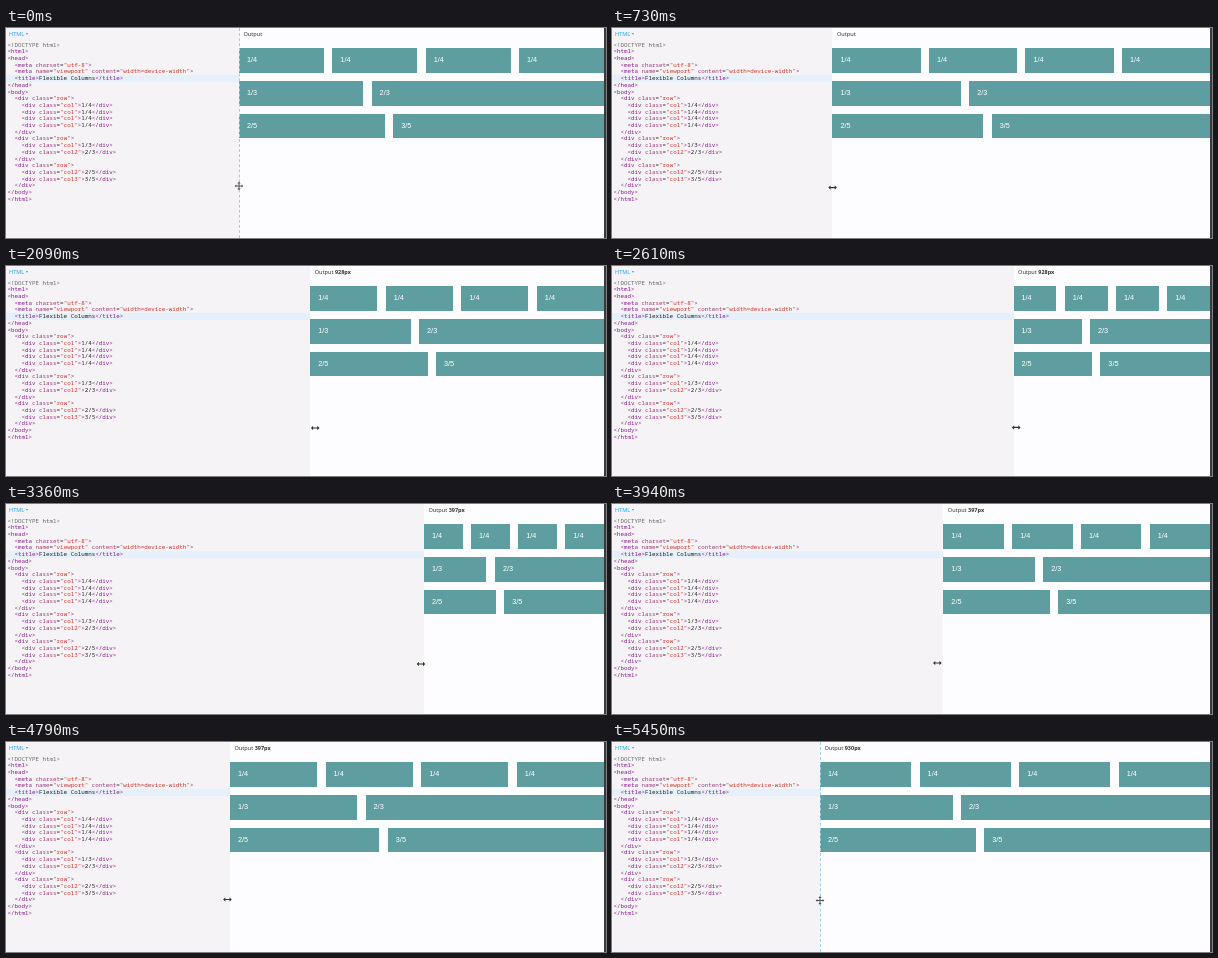
Recreate the animation shown at these times as an HTML page. Size 600 px wide and 210 px high, loop 5510 ms.

```html
<!DOCTYPE html>
<html lang="en">
<head>
<meta charset="utf-8">
<title>Flexible Columns</title>
<style>
  html, body { margin: 0; width: 100%; height: 100%; overflow: hidden; }
  #stage { position: relative; width: 600px; height: 210px; overflow: hidden; background: #fdfcfe; }
  #editor { position: absolute; left: 0; top: 0; height: 210px; overflow: hidden; background: #f5f3f6; }
  .head { position: absolute; top: 1px; white-space: nowrap; font: 500 5.6px/10px "Noto Sans", "Open Sans", sans-serif; color: #333; }
  #editor .head { left: 3px; color: #1ea8ec; }
  .head i { display: inline-block; margin-left: 2px; vertical-align: 1px; border: 1.8px solid transparent; border-top: 2.6px solid #1ea8ec; border-bottom: 0; }
  #code { position: absolute; left: 0; top: 13.6px; width: 100%; margin: 0; font: 5.85px/6.717px "Noto Sans Mono", "DejaVu Sans Mono", monospace; color: #222; }
  #code div { height: 6.717px; padding-left: 1.5px; white-space: pre; }
  #code .active { background: #e5f0fb; }
  .doctype { color: #666; }
  .tag { color: #8a1a8c; }
  .attr { color: #a03a78; }
  .str { color: #d0342c; }
  #output { position: absolute; top: 0; right: 2px; height: 210px; }
  #output .head { left: 4.5px; }
  #output b { font-weight: 700; font-size: 5.5px; }
  .row { position: absolute; left: 0; right: 0; height: 24.4px; display: flex; }
  .row div { flex: 1 1 0; min-width: 0; padding: 0 8px; background: #5f9ea0; color: #fff; font: 7.3px/24.4px "Liberation Sans", Arial, sans-serif; }
  .row div + div { margin-left: 8.4px; }
  #edge { position: absolute; right: 0; top: 0; width: 2px; height: 210px; background: #3a3a3e; }
  #guide { position: absolute; left: 0; top: 0; height: 210px; border-left: 1px dashed #9fcfe4; }
  #cursor { position: absolute; left: -6px; top: -6px; width: 12px; height: 12px; }
</style>
</head>
<body>
<div id="stage">
  <div id="output">
    <div class="head">Output <b id="size"></b></div>
  </div>
  <div id="editor">
    <div class="head">HTML<i></i></div>
    <div id="code"></div>
  </div>
  <div id="edge"></div>
  <div id="guide"></div>
  <svg id="cursor" viewBox="-6 -6 12 12">
    <path id="move" fill="#55555c" stroke="#fff" stroke-width=".4" paint-order="stroke"
      d="M0-4.4 1.6-2.6H.5V-.5H2.6V-1.6L4.4 0 2.6 1.6V.5H.5V2.6H1.6L0 4.4-1.6 2.6H-.5V.5H-2.6V1.6L-4.4 0-2.6-1.6V-.5H-.5V-2.6H-1.6Z"/>
    <path id="resize" fill="#333" stroke="#fff" stroke-width=".5" paint-order="stroke"
      d="M-4.3 0-2.1-2.2V-.6H2.1V-2.2L4.3 0 2.1 2.2V.6H-2.1V2.2Z"/>
  </svg>
</div>
<script>
const LOOP = 5510, GRAB = 60, RELEASE = 5300;
const $ = id => document.getElementById(id);

const source = `<!DOCTYPE html>
<html>
<head>
  <meta charset="utf-8">
  <meta name="viewport" content="width=device-width">
  <title>Flexible Columns</title>
</head>
<body>
  <div class="row">
    <div class="col">1/4</div>
    <div class="col">1/4</div>
    <div class="col">1/4</div>
    <div class="col">1/4</div>
  </div>
  <div class="row">
    <div class="col">1/3</div>
    <div class="col2">2/3</div>
  </div>
  <div class="row">
    <div class="col2">2/5</div>
    <div class="col3">3/5</div>
  </div>
</body>
</html>`;

function span(parent, cls, text) {
  const el = document.createElement('span');
  el.className = cls;
  el.textContent = text;
  parent.append(el);
}

function addLine(text) {
  const line = document.createElement('div');
  if (text.includes('<title>')) line.className = 'active';
  const parts = text.match(/<!.*?>|<\/?\w+|>|"[^"]*"|\w+(?==")|[^<>"]+?(?=[<>"]|\w+="|$)/g);
  for (const part of parts) {
    const cls = part.startsWith('<!') ? 'doctype'
      : /^[<>]/.test(part) ? 'tag'
      : part[0] === '"' ? 'str'
      : /^(class|charset|name|content)$/.test(part) ? 'attr' : '';
    span(line, cls, part);
  }
  $('code').append(line);
}
source.split('\n').forEach(addLine);

[['1/4', '1/4', '1/4', '1/4'], ['1/3', '2/3'], ['2/5', '3/5']].forEach((cells, i) => {
  const row = document.createElement('div');
  row.className = 'row';
  row.style.top = 20.4 + i * 32.8 + 'px';
  for (const text of cells) {
    const cell = document.createElement('div');
    cell.textContent = text;
    if (cells.length === 2) cell.style.flexGrow = text[0];
    row.append(cell);
  }
  $('output').append(row);
});

// Monotone cubic curve through [time, value] points
function curve(points) {
  const slope = points.slice(1).map(([t, v], i) => (v - points[i][1]) / (t - points[i][0]));
  const tangent = points.map((_, i) => {
    const a = slope[i - 1], b = slope[i];
    return a * b > 0 ? 2 * a * b / (a + b) : 0;
  });
  return t => {
    const next = points.findIndex(p => p[0] > t);
    if (next < 0) return points[points.length - 1][1];
    const i = Math.max(0, next - 1);
    const [t0, v0] = points[i], [t1, v1] = points[i + 1];
    const d = t1 - t0, u = (t - t0) / d, w = 1 - u;
    return v0 * (1 + 2 * u) * w * w + d * tangent[i] * u * w * w
      + v1 * u * u * (3 - 2 * u) - d * tangent[i + 1] * u * u * w;
  };
}

const dividerAt = curve([[0, 233], [90, 233], [600, 226], [1060, 205], [1190, 205], [1270, 207],
  [1730, 231], [2090, 304], [2300, 350], [2960, 432.5], [3040, 432.5], [3360, 418], [3450, 406],
  [3940, 331.5], [4640, 242], [4790, 224], [5210, 208.3], [5300, 208], [LOOP, 208]]);
const leadAt = curve([[0, 0], [1270, .5], [2090, 5], [2300, 5], [2960, 0], [3040, 0],
  [3360, -3], [3940, -6], [4640, -4], [4790, -2.5], [5210, 0], [LOOP, 0]]);
const heightAt = curve([[0, 158], [1270, 161], [2090, 162], [3360, 160], [3940, 159],
  [4790, 157.5], [5450, 158.5], [LOOP, 158.5]]);
const sizes = [[5210, '930px'], [3000, '397px'], [1330, '928px'], [1000, '938px'], [0, '']];

function draw(t) {
  const x = dividerAt(t);
  const idle = t < GRAB || t >= RELEASE;
  $('editor').style.width = x + 'px';
  $('output').style.left = x + 'px';
  $('guide').style.transform = `translateX(${Math.round(x)}px)`;
  $('guide').style.visibility = idle ? 'visible' : 'hidden';
  $('move').style.display = idle ? '' : 'none';
  $('resize').style.display = idle ? 'none' : '';
  $('cursor').style.transform = `translate(${x + leadAt(t)}px, ${heightAt(t)}px)`;
  $('size').textContent = sizes.find(s => t >= s[0])[1];
}

const start = performance.now();
function tick() {
  draw((performance.now() - start) % LOOP);
  requestAnimationFrame(tick);
}
tick();
</script>
</body>
</html>
```
